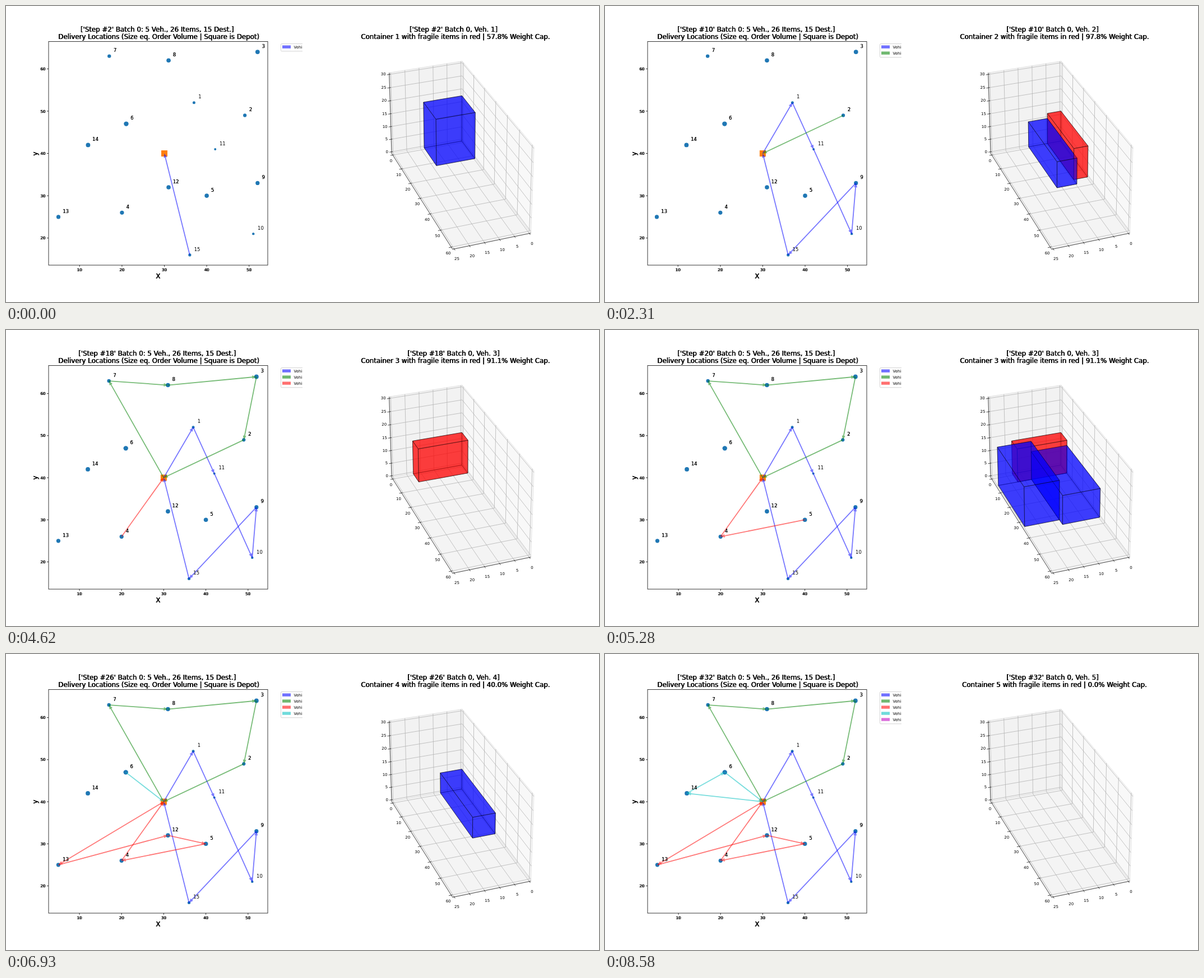
Recreate the animation shown at these times as an HTML page. Size 1058 by 529 pixels, loop 8.91 s.

```html
<!DOCTYPE html>
<html lang="en">
<head>
<meta charset="utf-8">
<title>Delivery loading</title>
<style>
html, body { margin: 0; width: 100%; height: 100%; overflow: hidden; background: #fff; }
svg { display: block; font-family: "DejaVu Sans", sans-serif; }
</style>
</head>
<body>
<svg id="stage" width="1058" height="529" viewBox="0 0 1058 529"></svg>
<script>
const STEP = 330, STEPS = 27, TITLE = 11.8;
const BLUE = "#0000ff", RED = "#ff0000";
const range = (end, by, start = 0) =>
  Array.from({ length: (end - start) / by + 1 }, (_, i) => start + i * by);
const n = v => v.toFixed(2);

// depot, then the numbered stops: x, y, marker radius
const STOPS = [[30, 40], [37, 52, 2.5], [49, 49, 3.1], [52, 64, 3.9], [20, 26, 3.6], [40, 30, 3.8],
  [21, 47, 4.2], [17, 63, 3.2], [31, 62, 3.8], [52, 33, 3.6], [51, 21, 2.2], [42, 41, 2],
  [31, 32, 3.8], [5, 25, 3.6], [12, 42, 3.9], [36, 16, 2.6]];

// ---- loading ----
const item = color => (x, w, l, h, stacked = false) => ({ color, x, w, l, h, stacked });
const blue = item(BLUE), red = item(RED);

// stops: the delivery each loaded item belongs to; items beyond the listed ones get random sizes
const VEHICLES = [
  { cap: "57.8", color: BLUE, stops: [15, 9, 9, 10, 11, 1], items: [blue(0, 14, 13, 18)] },
  { cap: "97.8", color: "#008000", stops: [2, 2, 3, 3, 8, 8, 7, 7], items: [
    red(0, 5, 26, 12), blue(5, 7, 29, 10), blue(12, 13, 29, 14),
    red(10, 8, 22, 8, true), red(0, 21, 11, 10), blue(0, 14, 17, 14)] },
  { cap: "91.1", color: RED, stops: [4, 4, 5, 5, 12, 13, 13], items: [
    red(0, 18, 6, 13), blue(0, 13, 31, 11), blue(13, 12, 28, 15),
    blue(0, 12, 33, 18, true), red(13, 9, 34, 9, true), red(0, 14, 15, 7)] },
  { cap: "40.0", color: "#00bfbf", stops: [6, 6, 6, 14, 14], items: [
    blue(0, 8, 32, 8), red(8, 11, 29, 12), blue(8, 13, 20, 8)] },
  { cap: "0.0", color: "#bf00bf", stops: [], items: [] }
];

let seed = 7;
const random = (lo, hi) => {
  seed = (seed * 16807) % 2147483647;
  return lo + Math.floor(seed / 2147483647 * (hi - lo + 1));
};
const randomItem = i => item(random(0, 2) ? BLUE : RED)(i % 2 * 13, random(9, 11), random(9, 16), random(7, 13));

// push a box against the back wall, on the floor or on the last box in its lane
function place(box, placed) {
  const lane = placed.filter(p => p.x < box.x + box.w && box.x < p.x + p.w);
  const settle = z => {
    const blocking = lane.filter(p => p.z < z + box.h && p.z + p.h > z);
    return { ...box, z, y: Math.max(0, ...blocking.map(p => p.y + p.l)) };
  };
  const floor = settle(0), below = lane[lane.length - 1];
  return below && (box.stacked || floor.y + box.l > 60) ? settle(below.z + below.h) : floor;
}
for (const v of VEHICLES) {
  v.boxes = [];
  v.stops.forEach((_, i) => v.boxes.push(place(v.items[i] || randomItem(i), v.boxes)));
}

// ---- drawing helpers ----
// shift paints the text twice, which gives it the heavier overprinted look
function text(x, y, s, size, anchor = "start", shift = 0) {
  const one = dx => `<text x="${n(x + dx)}" y="${n(y)}" font-size="${size}" text-anchor="${anchor}">${s}</text>`;
  return shift ? one(-shift / 2) + one(shift / 2) : one(0);
}
const title = (x, y, s) => text(x, y, s, TITLE, "middle", 0.7);
const points = pts => pts.map(p => p.map(n).join(",")).join(" ");
const poly = (pts, attrs) => `<polygon points="${points(pts)}" ${attrs}/>`;
const path = (color, pts) =>
  `<polyline points="${points(pts)}" fill="none" stroke="${color}" stroke-width=".8"/>`;

// ---- map on the left ----
function arrow(a, b, color) {
  const d = Math.hypot(b[0] - a[0], b[1] - a[1]);
  const ux = (b[0] - a[0]) / d, uy = (b[1] - a[1]) / d;
  const at = (back, side) => [b[0] - ux * back - uy * side, b[1] - uy * back + ux * side];
  return poly([at(d, 0.9), at(7.5, 0.9), at(7.5, 3), b, at(7.5, -3), at(7.5, -0.9), at(d, -0.9)],
    `fill="${color}" fill-opacity=".53"`);
}

function legend(count) {
  let s = `<rect x="490.5" y="67.5" width="60" height="${2.3 + 11 * count}" rx="1.5" fill="#fff" stroke="#d0d0d0" stroke-width=".9"/>`;
  for (let i = 0; i < count; i++) {
    s += `<rect x="493" y="${70.4 + 11 * i}" width="15" height="5.4" fill="${VEHICLES[i].color}" fill-opacity=".56"/>`;
    s += text(513.5, 75.8 + 11 * i, "Vehicle " + (i + 1), 7);
  }
  return s;
}

function map(index, step, veh, loaded) {
  // the limits widen with the first long route and again at the topmost stop
  const wide = index > 0, tall = index > 7;
  const k = tall ? 7.52 : 7.56, cx = wide ? 281.4 : 282.5, cy = tall ? 264 : 263.5;
  const at = ([x, y]) => [cx + k * (x - 30), cy - k * (y - 40)];
  const [depot, ...spots] = STOPS.map(at);
  let s = spots.map(([x, y], i) =>
    `<circle cx="${n(x)}" cy="${n(y)}" r="${STOPS[i + 1][2]}" fill="#1f77b4"/>`).join("");
  s += `<rect x="${n(depot[0] - 5.5)}" y="${n(depot[1] - 5.5)}" width="11" height="11" fill="#ff7f0e"/>`;

  VEHICLES.slice(0, veh + 1).forEach(({ stops, color }, v) => {
    const done = v < veh;
    const route = [0, ...new Set(done ? stops : stops.slice(0, loaded)), ...(done ? [0] : [])];
    for (let i = 1; i < route.length; i++) s += arrow(at(STOPS[route[i]]), at(STOPS[route[i - 1]]), color);
  });
  spots.forEach(([x, y], i) => {
    s += text(x + 7.8, y - 7.3, i + 1, 8.4, "start", STOPS[i + 1][2] > 3 ? 0.2 : 0);
  });

  s += `<rect x="76" y="63.5" width="391" height="399.6" fill="none" stroke="#222" stroke-width=".9"/>`;
  for (const t of range(60, 10, 10)) {
    const [x, y] = at([t, t]);
    if (t < 60) s += path("#000", [[x, 463], [x, 466]]) + text(x, 473.6, t, 7, "middle", 1);
    if (t > 10) s += path("#000", [[73, y], [76, y]]) + text(66, y + 2.6, t, 7, "middle", 1);
  }
  s += title(271.5, 487, "X") + `<g transform="translate(55.6 264) rotate(-90)">${title(0, 0, "y")}</g>`;
  s += title(269.8, 46.3, `['Step #${step}' Batch 0: 5 Veh., 26 Items, 15 Dest.]`);
  s += title(272.8, 59, "Delivery Locations (Size eq. Order Volume | Square is Depot)");
  return `<svg width="529" height="529">${s}${legend(veh + 1)}</svg>`;
}

// ---- container on the right: camera raised 30 degrees, turned 20 ----
const SIN = Math.sin(Math.PI / 9), COS = Math.cos(Math.PI / 9), TILT = Math.sqrt(3) / 2;
const X0 = -0.52, X1 = 25.52, Y0 = -1.25, Y1 = 61.25, Z0 = -0.625, Z1 = 30.625;

const ground = (x, y) => (x - 12.5) * SIN + (y - 30) * COS;
const nearness = ([x, y, z]) => ground(x, y) * TILT + (z - 15) / 2;
function project([x, y, z]) {
  const k = 2245 / (407.6 - nearness([x, y, z]));
  return [805.8 + k * ((y - 30) * SIN - (x - 12.5) * COS),
    257.8 + k * (ground(x, y) / 2 - (z - 15) * TILT)];
}
const quad = (pts, attrs) => poly(pts.map(project), attrs);
const path3 = (color, ...pts) => path(color, pts.map(project));

// the six faces of a block, the three hidden ones first
function faces([x, y, z], [X, Y, Z]) {
  const side = a => [[a, y, z], [a, Y, z], [a, Y, Z], [a, y, Z]];
  const end = b => [[x, b, z], [X, b, z], [X, b, Z], [x, b, Z]];
  const flat = c => [[x, y, c], [X, y, c], [X, Y, c], [x, Y, c]];
  return [side(x), end(y), flat(z), side(X), end(Y), flat(Z)];
}

function room() {
  const grid = "#b4b4b4", axis = "#222", shades = ["#f8f8f8", "#f2f2f2", "#f4f4f4"];
  let s = shades.map((fill, i) => quad(faces([X0, Y0, Z0], [X1, Y1, Z1])[i],
    `fill="${fill}" stroke="#dcdcdc" stroke-width=".8"`)).join("");
  const xs = range(25, 5), ys = range(60, 10), zs = range(30, 5);
  for (const x of xs) s += path3(grid, [x, Y1, Z0], [x, Y0, Z0], [x, Y0, Z1]);
  for (const y of ys) s += path3(grid, [X1, y, Z0], [X0, y, Z0], [X0, y, Z1]);
  for (const z of zs) s += path3(grid, [X1, Y0, z], [X0, Y0, z], [X0, Y1, z]);
  s += path3(axis, [X1, Y0, Z1], [X1, Y0, Z0], [X1, Y1, Z0], [X0, Y1, Z0]);

  const mark = (p, [dx, dy], label, ox, oy, anchor) => {
    const [u, v] = project(p), off = t => [p[0] + dx * t, p[1] + dy * t, p[2]];
    return path3(axis, off(-0.4), off(0.8)) + text(u + ox, v + oy, label, 7, anchor);
  };
  for (const x of xs) s += mark([x, Y1, Z0], [0, 1], x, 4.8, 20.2, "middle");
  for (const y of ys) s += mark([X1, y, Z0], [1, 0], y, -0.8, 12.6, "end");
  for (const z of zs) s += mark([X1, Y0, z], [1, 0], z, -6, 2, "end");
  return s;
}

const ROOM = room();
const depth = face => face.reduce((sum, p) => sum + nearness(p), 0) / 4;

function container(step, veh, loaded) {
  const { boxes, cap } = VEHICLES[veh];
  const skin = boxes.slice(0, loaded).flatMap(({ color, x, y, z, w, l, h }) =>
    faces([x, y, z], [x + w, y + l, z + h]).map(face => ({ face, color })));
  // all faces share one depth order, so the tints of overlapping boxes interleave
  skin.sort((a, b) => depth(a.face) - depth(b.face));
  return ROOM + skin.map(({ face, color }) => quad(face, `fill="${color}" fill-opacity=".5" ` +
      `stroke="#000" stroke-opacity=".6" stroke-width=".75" stroke-linejoin="round"`)).join("")
    + title(798.6, 46.3, `['Step #${step}' Batch 0, Veh. ${veh + 1}]`)
    + title(802, 59, `Container ${veh + 1} with fragile items in red | ${cap}% Weight Cap.`);
}

// ---- playback ----
const stage = document.getElementById("stage");
let shown = -1;
function draw(index) {
  let veh = 0, loaded = index + 1;
  while (veh < 4 && loaded > VEHICLES[veh].stops.length) loaded -= VEHICLES[veh++].stops.length;
  const step = index + 2 + veh;
  stage.innerHTML = map(index, step, veh, loaded) + container(step, veh, loaded);
}
function tick() {
  const index = Math.floor(performance.now() / STEP) % STEPS;
  if (index !== shown) draw(shown = index);
  requestAnimationFrame(tick);
}
tick();
</script>
</body>
</html>
```
